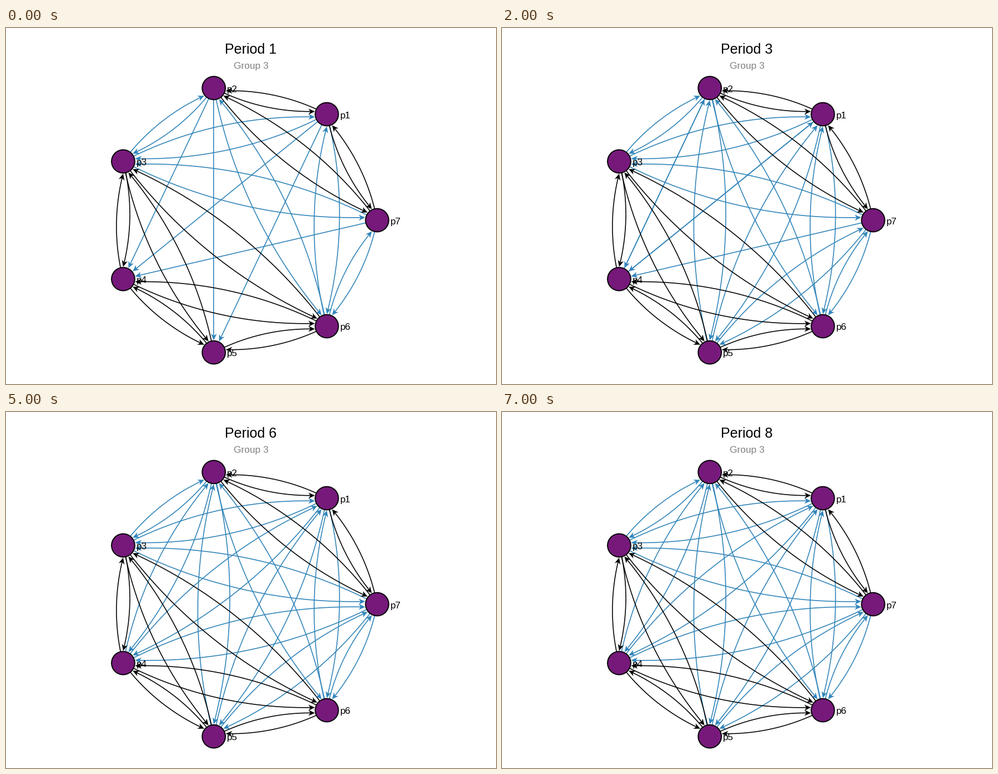
A matplotlib script for the animation above (8000 ms loop, 878 by 638 pixels).

```python
import numpy as np
import matplotlib.pyplot as plt
from matplotlib.animation import FuncAnimation
from matplotlib.patches import Circle, Polygon

W, H, DPI = 878, 638, 100
PX = 72 / DPI
BLUE, BLACK, PURPLE, GRAY = "#3084b9", "#000000", "#76197b", "#808080"
PERIODS = 8
GAP = 22                   # distance from node centre to arrow tip
HALF = np.arcsin(0.25)     # arc radius is twice the chord

# The small surplus keeps the pixel size from rounding down
fig = plt.figure(figsize=((W + 0.01) / DPI, (H + 0.01) / DPI), dpi=DPI,
                 facecolor="white")
ax = fig.add_axes([0, 0, 1, 1])
ax.set_xlim(0, W)
ax.set_ylim(H, 0)
ax.axis("off")

# Seven nodes around an ellipse, p7 at angle zero
nodes = {}
for k in range(1, 8):
    a = 2 * np.pi * k / 7
    nodes[k] = np.array([425.6 + 239.4 * np.cos(a), 344.5 - 243 * np.sin(a)])


def label(x, y, text, size, color=BLACK, ha="left"):
    return ax.text(x, y, text, fontsize=size * PX, color=color, ha=ha,
                   va="baseline", family="Liberation Sans", zorder=6)


def edge(i, j, color, curved):
    """Arrow from the centre of node i to the rim of node j."""
    a, b = nodes[i], nodes[j]
    d = b - a
    u = d / np.hypot(*d)
    side = -1 if d[0] * d[1] > 1 else 1
    n = side * np.array([u[1], -u[0]])
    tip = b - GAP * u
    chord = np.hypot(*(tip - a))
    if curved:
        r = 2 * chord
        t = np.linspace(-HALF, HALF - 5 / r, 60)[:, None]
        pts = (a + tip) / 2 + r * np.sin(t) * u + r * (np.cos(t) - np.cos(HALF)) * n
        f = np.cos(HALF) * u - np.sin(HALF) * n
    else:
        pts = np.array([a, tip - 5 * u])
        f = u
    line, = ax.plot(pts[:, 0], pts[:, 1], color=color, lw=1.6 * PX,
                    solid_capstyle="butt", zorder=2)
    w = np.array([-f[1], f[0]])
    head = Polygon([tip, tip - 11.5 * f + 5.3 * w, tip - 8 * f, tip - 11.5 * f - 5.3 * w],
                   closed=True, fc=color, ec="none", zorder=3)
    ax.add_patch(head)
    return line, head


spans = []   # (first period, end period, artists)


def add(pair, color, curved, start=0, end=PERIODS, both=True):
    i, j = int(pair[0]), int(pair[1])
    for s, t in ((i, j), (j, i))[:2 if both else 1]:
        spans.append((start, end, edge(s, t, color, curved)))


for pair in "13 16 23 26 37 67".split():
    add(pair, BLUE, True)
for pair in "15 25".split():
    add(pair, BLUE, False, 0, 1, both=False)
    add(pair, BLUE, True, 1)
add("57", BLUE, True, 1)

# Links to p4: one-way, then two-way, then bent apart
for pair, reply, bend in (("24", 1, 3), ("14", 1, 4), ("74", 4, 4)):
    add(pair, BLUE, False, 0, bend, both=False)
    if reply < bend:
        add(pair[::-1], BLUE, False, reply, bend, both=False)
    add(pair, BLUE, True, bend)

for pair in "12 17 27 34 35 36 45 46 56".split():
    add(pair, BLACK, True)

for k, (x, y) in nodes.items():
    ax.add_patch(Circle((x, y), 20.8, fc=PURPLE, ec=BLACK, lw=1.9 * PX, zorder=5))
    label(x + 24, y + 7, f"p{k}", 17)

title = label(392.3, 46, "Period 1", 25)
label(438.7, 73, "Group 3", 17.2, GRAY, "center")


def update(frame):
    title.set_text(f"Period {frame + 1}")
    for start, end, artists in spans:
        for art in artists:
            art.set_visible(start <= frame < end)
    return [title]


anim = FuncAnimation(fig, update, frames=PERIODS, interval=1000,
                     repeat=True, repeat_delay=0, blit=False)
plt.show()
```
